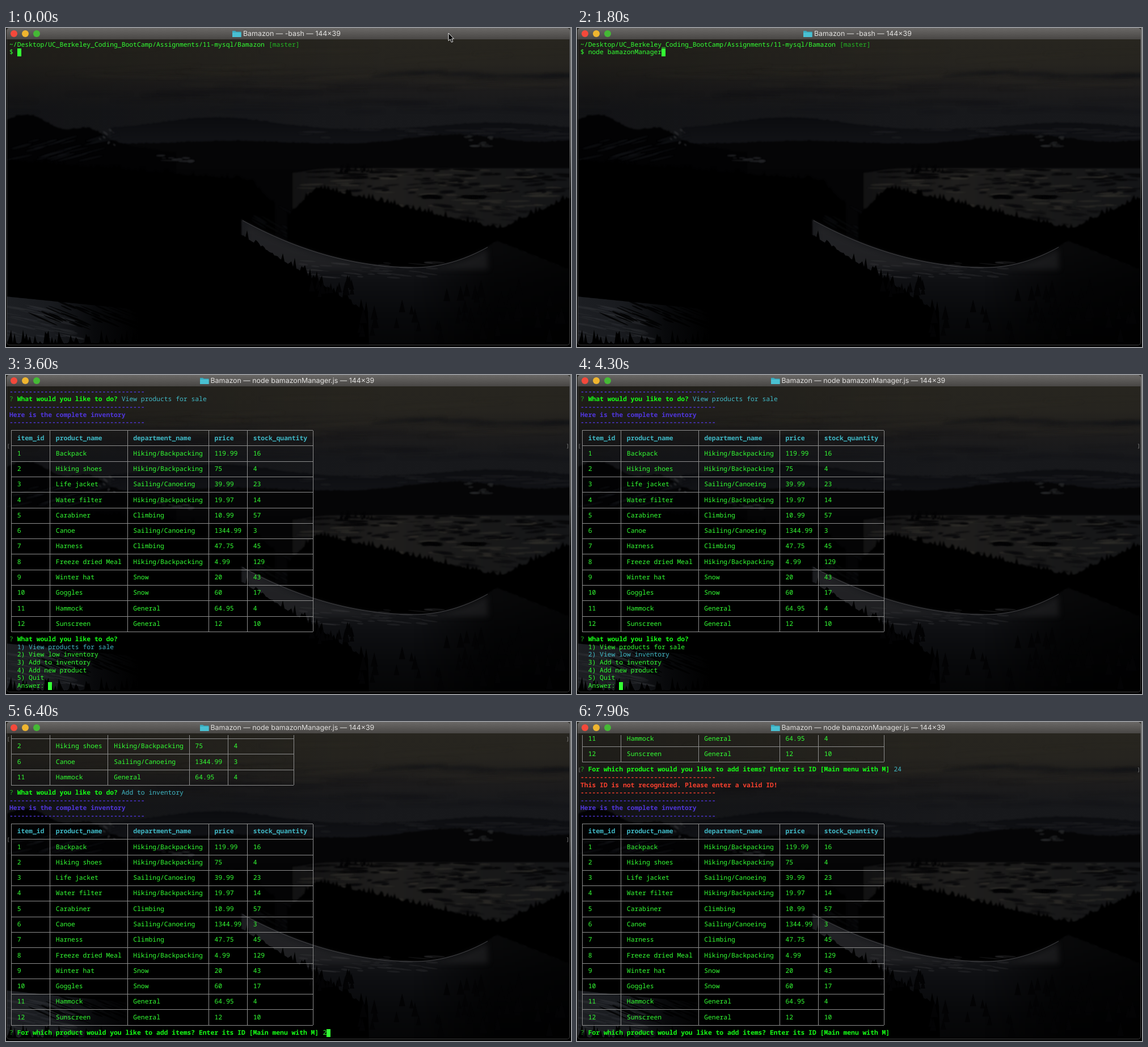
Animation of 996x562 px, one loop 8000 ms. Source, as an HTML page with a canvas:

```html
<!DOCTYPE html>
<html lang="en">
<head>
<meta charset="utf-8">
<title>Terminal</title>
<style>
html, body { margin: 0; width: 100%; height: 100%; overflow: hidden; background: #000; }
#stage { position: relative; width: 996px; height: 562px; overflow: hidden; }
#land { position: absolute; left: 0; top: 0; }
#frame { position: absolute; left: 1px; top: 0; width: 991px; height: 558px; border: 1px solid #3b3b3b; border-top: 0; border-radius: 5px; }
#edge { position: absolute; left: 994px; top: 0; width: 2px; height: 300px; background: linear-gradient(#777, #555 70%, #111); }
#bar { position: absolute; left: 1px; top: 0; width: 993px; height: 20px; border-radius: 5px 5px 0 0; background: linear-gradient(#6a6866, #484644); }
.light { position: absolute; top: 4px; width: 12px; height: 12px; border-radius: 50%; }
#folder { position: absolute; top: 4px; }
#title { position: absolute; top: 0; color: #e2e1df; font: 12.4px/20px Inter, sans-serif; white-space: nowrap; text-rendering: geometricPrecision; }
#term { position: absolute; left: 6px; top: 22.7px; color: #33ff33; font: 500 11.367px/13.64px "Noto Sans Mono", "DejaVu Sans Mono", monospace; text-rendering: geometricPrecision; }
#term div { position: absolute; left: 0; height: 13.64px; }
#term span, #term i, #term b { position: absolute; top: 0; white-space: pre; font-style: normal; }
#term i { background: #8d8d8d; }
#term b { width: 7px; height: 13.64px; background: #33ff33; }
#term .bold { color: #16ff16; font-weight: 700; }
#term .dim { color: #23b523; }
#term .cyan { color: #40b9c6; }
#term .head { color: #40b9c6; font-weight: 700; }
#term .blue { color: #5036dc; font-weight: 700; }
#term .red { color: #f8402e; font-weight: 700; }
#term .mark { color: #858585; font-size: 9px; }
#mouse { position: absolute; left: 779px; top: 8px; }
</style>
</head>
<body>
<div id="stage">
  <canvas id="land" width="996" height="562"></canvas>
  <div id="frame"></div>
  <div id="edge"></div>
  <div id="bar"></div>
  <div class="light" style="left:8px;background:#f4493b"></div>
  <div class="light" style="left:28px;background:#efb52f"></div>
  <div class="light" style="left:48px;background:#45b936"></div>
  <svg id="folder" width="16" height="13"><path d="M0 1H5L7 2.5H15.5V12H0Z" fill="#38a9bd"/><path d="M0 4H15.5V12H0Z" fill="#49c0d2"/></svg>
  <div id="title"></div>
  <div id="term"></div>
  <svg id="mouse" width="13" height="20"><path d="M1 1V14.5L4.2 11.7L6.3 17L8.8 16L6.7 11H10.5Z" fill="#000" stroke="#eee"/></svg>
</div>
<script>
const LOOP = 8000, CW = 6.82, LH = 13.64, ROWS = 39;
const $ = id => document.getElementById(id);

// ---- Night landscape ----
const ctx = $('land').getContext('2d');
let seed = 7;
const rnd = () => (seed = (seed * 16807) % 2147483647) / 2147483647;
const bump = (x, center, width, height) => height * Math.exp(-(((x - center) / width) ** 2));

function blend(x0, y0, x1, y1, ...colors) {
  const g = ctx.createLinearGradient(x0, y0, x1, y1);
  colors.forEach((c, i) => g.addColorStop(i / (colors.length - 1), c));
  return g;
}
const fade = (y0, y1, ...colors) => blend(0, y0, 0, y1, ...colors);

function box(fill, x, y, w, h) {
  ctx.fillStyle = fill;
  ctx.fillRect(x, y, w, h);
}

// Ground below the curve top(x); spikes stand for treetops
function ground(fill, x0, x1, top, bottom, spikes = 0) {
  ctx.fillStyle = fill;
  ctx.beginPath();
  ctx.moveTo(x0, bottom);
  for (let x = x0; x <= x1; x += 3) ctx.lineTo(x, top(x) - spikes * rnd() ** 3);
  ctx.lineTo(x1, bottom);
  ctx.fill();
}

// Thin random streaks within a box
function streaks(fill, n, x, y, w, h, len, tilt = 0) {
  ctx.fillStyle = fill;
  for (let i = 0; i < n; i++) {
    ctx.beginPath();
    ctx.ellipse(x + rnd() * w, y + rnd() * h, len * (.3 + rnd()), .6 + rnd() * 1.4, tilt + (rnd() - .5) * .1, 0, 7);
    ctx.fill();
  }
}

// Random fir trees within a box
function grove(n, x, y, w, h, size) {
  ctx.fillStyle = '#030304';
  for (let i = 0; i < n; i++) {
    const tx = x + rnd() * w, ty = y + rnd() * h, s = size * (.6 + rnd() * .6);
    ctx.beginPath();
    ctx.moveTo(tx, ty - s);
    ctx.lineTo(tx + s * .25, ty);
    ctx.lineTo(tx - s * .25, ty);
    ctx.fill();
  }
}

const farRidge = x => 180 - bump(x, 370, 140, 22) - bump(x, 860, 130, 13);
const midHills = x => 205 - bump(x, 400, 120, 6) - bump(x, 790, 110, 17) - bump(x, 1000, 50, 6);
const leftHills = x => 176 + x * .15 - bump(x, 42, 50, 28) - bump(x, 145, 40, 20);
const leftWoods = x => 234 + x * .08 + Math.max(0, x - 430) * .9;
const midWoods = x => Math.max(355 - Math.max(.23 * (870 - x), .45 * (x - 870)), 828 - x);
const slope = x => x < 720 ? 421 - 84 * ((720 - x) / 305) ** 2
  : x < 866 ? 421 - 46 * ((x - 720) / 146) ** 2 : 375 + (x - 866) * .4;

function paintLand() {
  box(fade(20, 190, '#27251f', '#26241f', '#1d1c1c', '#17181b', '#18191c'), 0, 0, 996, 562);
  box(blend(0, 0, 700, 0, '#00000038', '#0000'), 0, 0, 996, 200);
  ctx.filter = 'blur(2.5px)';
  streaks('#0d0e1255', 26, 0, 92, 996, 60, 100);
  streaks('#39352c44', 20, 200, 28, 790, 75, 110, -.02);
  streaks('#101115aa', 12, 690, 79, 306, 8, 60, -.04);

  ctx.filter = 'blur(.8px)';
  ground(fade(158, 215, '#0b0c0f', '#131418'), 185, 996, farRidge, 260, 2);
  streaks('#1e1f2288', 30, 500, 178, 490, 18, 30);
  ground('#050506', 180, 996, midHills, 260, 2);
  streaks('#2c2d2f99', 14, 810, 190, 46, 20, 10);
  box('#040405', 0, 250, 996, 312);
  ground('#020203', 0, 300, leftHills, 300, 3);
  streaks('#14161a88', 30, 20, 190, 160, 40, 24, -.25);
  streaks('#27282b', 9, 165, 180, 26, 26, 5, .7);
  streaks('#202124', 12, 272, 224, 55, 12, 12);

  // Lit fields with hedges and copses
  ground(blend(500, 0, 996, 0, '#111112', '#1f1e1d', '#191919', '#141517'), 505, 996, x => 247 + bump(x, 500, 40, 8), 352);
  streaks('#38352f88', 70, 525, 250, 450, 85, 22);
  streaks('#060607', 60, 540, 248, 456, 20, 17);
  streaks('#08080a', 45, 600, 268, 390, 22, 14, -.06);
  streaks('#0b0b0dcc', 35, 700, 310, 220, 40, 16, .08);
  streaks('#040405', 14, 735, 296, 26, 4, 12);
  streaks('#040405', 20, 803, 296, 42, 3, 12);
  grove(16, 590, 250, 55, 6, 11);

  // Woods around the valley
  ground('#000', 0, 475, leftWoods, 562, 9);
  streaks('#0e0f1299', 10, 440, 312, 75, 70, 22, .5);
  ground('#000', 496, 996, midWoods, 450, 13);

  // Snow slope
  ground(fade(340, 562, '#1c1d20', '#191a1d', '#0e0f12', '#08090b', '#050506'), 415, 996, slope, 562);
  ground(blend(720, 0, 996, 0, '#0000', '#000a', '#000c'), 720, 996, slope, 562, 10);
  ctx.filter = 'blur(5px)';
  ground('#2b2c2e77', 425, 850, x => slope(x) + 4, 425);
  ctx.filter = 'blur(.6px)';
  streaks('#36373a55', 40, 520, 410, 240, 30, 18, .08);
  ctx.strokeStyle = '#444447';
  ctx.beginPath();
  for (let x = 417; x < 852; x += 3) ctx.lineTo(x, slope(x) + 1);
  ctx.stroke();

  // Nearest trees
  ground('#000', 380, 640, x => 343 + (x - 380) * .62, 562, 20);
  grove(14, 530, 450, 80, 25, 19);
  grove(12, 620, 500, 110, 50, 24);
  grove(40, 760, 470, 230, 85, 26);

  // Snow patch in the corner
  ground(blend(0, 0, 235, 0, '#1d1f23', '#191b1f', '#08090b', '#000'), 0, 234, x => 473 + x * .1, 562);
  streaks('#2b2d3288', 40, 0, 490, 120, 55, 22, .2);
  streaks('#000c', 40, 60, 478, 170, 45, 24, .4);
  ground('#000', 0, 240, () => 556, 562, 26);
  ctx.filter = 'none';
  box('#000', 0, 559, 996, 3);
  box('#000', 0, 20, 1, 542);
}

// ---- Terminal ----
const run = (col, text, cls = '') => `<span class="${cls}" style="left:${col * CW}px">${text}</span>`;
const line = (x, y, w, h) => `<i style="left:${x}px;top:${y}px;width:${w}px;height:${h}px"></i>`;
const mid = col => (col + .5) * CW - .5;
const bars = (cols, y = 0, h = LH) => cols.map(c => line(mid(c), y, 1, h)).join('');
const rule = (cols, y, h) => line(mid(0), LH / 2 - .5, mid(cols.at(-1)) - mid(0), 1) + bars(cols, y, h);

const HIKE = 'Hiking/Backpacking', SAIL = 'Sailing/Canoeing';
const HEAD = ['item_id', 'product_name', 'department_name', 'price', 'stock_quantity'];
const STOCK = [
  ['Backpack', HIKE, 119.99, 16], ['Hiking shoes', HIKE, 75, 4], ['Life jacket', SAIL, 39.99, 23],
  ['Water filter', HIKE, 19.97, 14], ['Carabiner', 'Climbing', 10.99, 57], ['Canoe', SAIL, 1344.99, 3],
  ['Harness', 'Climbing', 47.75, 45], ['Freeze dried Meal', HIKE, 4.99, 129], ['Winter hat', 'Snow', 20, 43],
  ['Goggles', 'Snow', 60, 17], ['Hammock', 'General', 64.95, 4], ['Sunscreen', 'General', 12, 10]
].map((r, i) => [i + 1, ...r]);

// Each column is as wide as its longest cell
function table(items) {
  const cols = [0];
  HEAD.forEach((name, i) => {
    const widest = Math.max(name.length, ...items.map(r => String(r[i]).length));
    cols.push(cols[i] + widest + 3);
  });
  const row = (cells, cls) => bars(cols) + cells.map((s, i) => run(cols[i] + 2, s, cls)).join('');
  const out = [rule(cols, LH / 2, LH / 2), row(HEAD, 'head')];
  for (const item of items) out.push(rule(cols, 0, LH), row(item));
  return [...out, rule(cols, 0, LH / 2)];
}

const banner = (text, cls = 'blue') => ['-'.repeat(35), text, '-'.repeat(35)].map(s => run(0, s, cls));
const ask = (text, answer = '', cls = 'cyan') =>
  run(0, '?', 'dim') + run(2, text, 'bold') + run(text.length + 3, answer, cls);
const TODO = 'What would you like to do?';
const WHICH = 'For which product would you like to add items? Enter its ID [Main menu with M]';
const OPTIONS = ['View products for sale', 'View low inventory', 'Add to inventory', 'Add new product', 'Quit'];
const COMMAND = 'node bamazonManager.js';
const inventory = [...banner('Here is the complete inventory'), ...table(STOCK)];
const lowStock = [...banner('Here is the inventory showing low-quantity products'), ...table(STOCK.filter(r => r[4] < 5))];
const menu = pick => [ask(TODO), ...OPTIONS.map((s, i) => run(2, `${i + 1}) ${s}`, i === pick ? 'cyan' : '')), run(2, 'Answer:')];

// Times of key presses
const TYPE = 300, KEY = 80, START = 2400, VIEW = 3100, DOWN = 4000, VIEW_LOW = 4400,
  DOWN_2 = 4800, DOWN_3 = 5050, ADD = 5600, DIGIT_1 = 6300, DIGIT_2 = 6650, SEND = 7150;

function session(t) {
  const typed = Math.max(0, Math.min(COMMAND.length, Math.floor((t - TYPE) / KEY) + 1));
  const log = [
    run(0, '~/Desktop/UC_Berkeley_Coding_BootCamp/Assignments/11-mysql/Bamazon') + run(67, '[master]', 'dim'),
    run(0, '$ ' + COMMAND.slice(0, typed))
  ];
  const marks = [];
  // Marks the current line, drops the open prompt and adds the reply
  const enter = (drop, ...lines) => {
    marks.push(log.length - 1);
    log.length -= drop;
    log.push(...lines);
  };
  let caret = 2 + typed;
  if (t >= START) {
    enter(0, ...banner("Welcome in the Bamazon manager's space!"), ...menu(0));
    caret = 10;
  }
  if (t >= VIEW) enter(7, ask(TODO, OPTIONS[0]), ...inventory, ...menu(t >= DOWN ? 1 : 0));
  if (t >= VIEW_LOW) enter(7, ask(TODO, OPTIONS[1]), ...lowStock, ...menu((t >= DOWN_2) + (t >= DOWN_3)));
  if (t >= ADD) {
    const digits = (t >= DIGIT_1) + (t >= DIGIT_2);
    enter(7, ask(TODO, OPTIONS[2]), ...inventory, ask(WHICH, '24'.slice(0, digits), ''));
    caret = WHICH.length + 3 + digits;
  }
  if (t >= SEND) {
    enter(1, ask(WHICH, '24'), ...banner('This ID is not recognized. Please enter a valid ID!', 'red'), ...inventory, ask(WHICH));
    caret = WHICH.length + 3;
  }
  return { log, marks, caret };
}

function screen(t) {
  const { log, marks, caret } = session(t);
  const typing = t >= TYPE && t < 2100;
  if (typing || t % 1000 < 650) log[log.length - 1] += `<b style="left:${caret * CW}px"></b>`;
  for (const i of marks) log[i] += run(-.65, '[', 'mark') + run(143.9, ']', 'mark');
  return log.slice(-ROWS).map((s, i) => `<div style="top:${i * LH}px">${s}</div>`).join('');
}

let shown = '';
function tick() {
  const t = performance.now() % LOOP;
  const html = screen(t);
  if (html !== shown) $('term').innerHTML = shown = html;
  const running = t >= START;
  const left = running ? 360.5 : 418;
  $('title').textContent = `Bamazon — ${running ? COMMAND : '-bash'} — 144×39`;
  $('title').style.left = left + 'px';
  $('folder').style.left = left - 19 + 'px';
  $('mouse').style.display = t < TYPE ? '' : 'none';
  requestAnimationFrame(tick);
}

paintLand();
tick();
</script>
</body>
</html>
```
